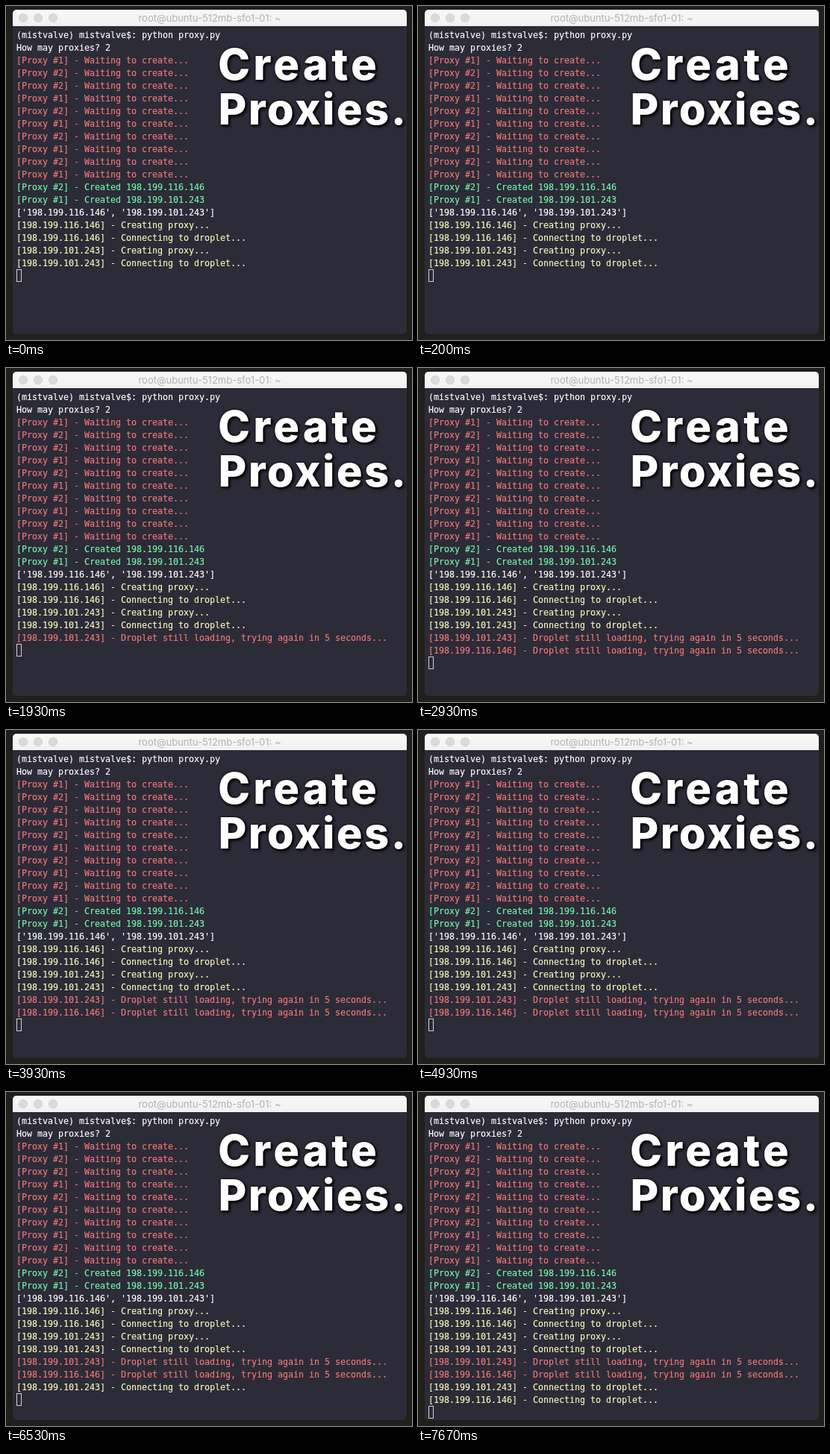
Recreate the animation shown at these times as an HTML page. Size 544 by 448 pixels, loop 8 s.

```html
<!DOCTYPE html>
<html lang="en">
<head>
<meta charset="utf-8">
<title>Terminal</title>
<style>
  html, body { margin: 0; width: 100%; height: 100%; overflow: hidden; background: #211f1b; }
  svg { display: block; width: 100vw; height: 100vh; }
  .line { font: 11.63px "DejaVu Sans Mono", monospace; stroke-width: .15; }
  .bar { font: 13px Inter, sans-serif; fill: #b2b2b2; }
  .headline {
    font: 800 58px Inter, sans-serif;
    fill: #fff;
    filter: drop-shadow(0 0 1.5px #000) drop-shadow(2px 2px 1.5px #000);
  }
</style>
</head>
<body>
<svg viewBox="0 0 544 448">
  <defs>
    <linearGradient id="chrome" x2="0" y2="1">
      <stop offset="0" stop-color="#f8f8f8"/>
      <stop offset="1" stop-color="#f1f1f1"/>
    </linearGradient>
  </defs>
  <rect width="544" height="448" fill="#211f1b"/>
  <rect x="9" y="5" width="528" height="435" rx="5" fill="#2c2b38"/>
  <path d="M9 27V10a5 5 0 0 1 5-5H532a5 5 0 0 1 5 5V27Z" fill="url(#chrome)"/>
  <g fill="#dadada" stroke="#cccccc" stroke-width=".7">
    <circle cx="23" cy="16" r="5.7"/>
    <circle cx="43" cy="16" r="5.7"/>
    <circle cx="63" cy="16" r="5.7"/>
  </g>
  <text class="bar" x="273" y="20.5" text-anchor="middle">root@ubuntu-512mb-sfo1-01: ~</text>
  <g id="screen"></g>
  <rect id="cursor" x="14.5" width="6" height="16" fill="none" stroke="#d0d0d0"/>
  <g class="headline">
    <text x="284" y="98.5" letter-spacing="4.2">Create</text>
    <text x="284.5" y="159" letter-spacing="2.4">Proxies.</text>
  </g>
</svg>
<script>
const LOOP = 8000, LEFT = 14, TOP = 39, PITCH = 17;
const WHITE = '#ffffff', RED = '#f27878', GREEN = '#76f6ac', YELLOW = '#f8f9ba';
const IP1 = '198.199.101.243', IP2 = '198.199.116.146';

const screen = document.getElementById('screen');
const cursor = document.getElementById('cursor');
const lines = [];

function addLine(text, color, at = 0) {
  const el = document.createElementNS('http://www.w3.org/2000/svg', 'text');
  el.setAttribute('class', 'line');
  el.setAttribute('x', LEFT);
  el.setAttribute('y', TOP + PITCH * lines.length + 4);
  el.setAttribute('fill', color);
  el.setAttribute('stroke', color);
  el.textContent = text;
  screen.append(el);
  lines.push({ el, at });
}

const status = (ip, text, color, at) => addLine(`[${ip}] - ${text}...`, color, at);
const connect = (ip, at) => status(ip, 'Connecting to droplet', YELLOW, at);
const retry = (ip, at) => status(ip, 'Droplet still loading, trying again in 5 seconds', RED, at);

addLine('(mistvalve) mistvalve$: python proxy.py', WHITE);
addLine('How may proxies? 2', WHITE);
for (const n of '1221212121') addLine(`[Proxy #${n}] - Waiting to create...`, RED);
addLine(`[Proxy #2] - Created ${IP2}`, GREEN);
addLine(`[Proxy #1] - Created ${IP1}`, GREEN);
addLine(`['${IP2}', '${IP1}']`, WHITE);
for (const ip of [IP2, IP1]) {
  status(ip, 'Creating proxy', YELLOW);
  connect(ip);
}
retry(IP1, 1460);
retry(IP2, 2330);
connect(IP1, 6460);
connect(IP2, 7330);

function draw(t) {
  let shown = 0;
  for (const { el, at } of lines) {
    const visible = t >= at;
    el.setAttribute('visibility', visible ? 'visible' : 'hidden');
    if (visible) shown++;
  }
  cursor.setAttribute('y', TOP + PITCH * shown - 8.5);
}

const start = performance.now();
function tick() {
  draw((performance.now() - start) % LOOP);
  requestAnimationFrame(tick);
}
tick();
</script>
</body>
</html>
```
